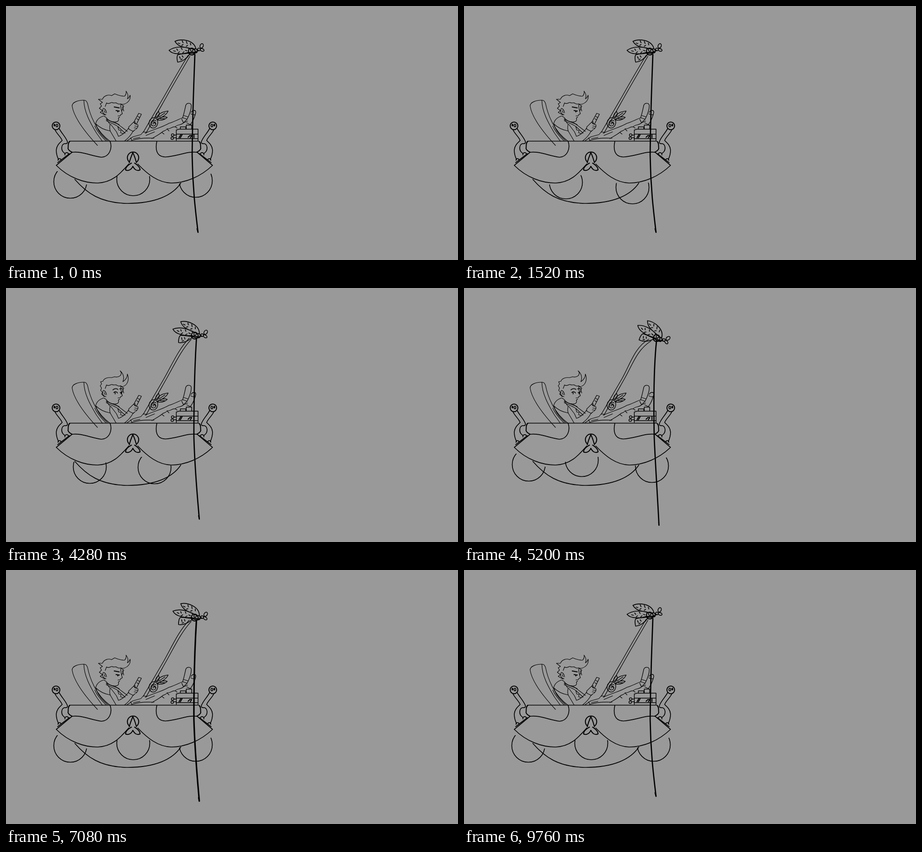
These frames come from a looping animation (998 px wide and 561 px high, 9.84 s). An HTML page:

```html
<!DOCTYPE html>
<html>
<head>
<meta charset="utf-8">
<style>
html, body { margin: 0; width: 100%; height: 100%; overflow: hidden; background: #999; }
svg { display: block; width: 998px; height: 561px; fill: none; stroke: #000; stroke-width: 1.15; stroke-linecap: round; stroke-linejoin: round; }
.mid { stroke-width: 1.7; }
.bold { stroke-width: 2.1; }
.ink { fill: #000; }
</style>
</head>
<body>
<svg viewBox="0 0 998 561">
<defs>
  <clipPath id="below"><path d="M95 350L108 362L150 384L180 395L202 393L243 376L262 373H300L318 376L338 392H382L410 390L450 373L470 350V460H95Z"/></clipPath>
  <g id="horn">
    <circle class="bold" cx="110.500" cy="264.800" r="8.500"/>
    <ellipse class="ink" cx="107" cy="263" rx="1" ry="2"/>
    <ellipse cx="112.500" cy="264" rx="2" ry="3"/>
    <path d="M108 273C111 281 121 289 124 297C119 302 112 307 111 318C111 328 114 335 116 339M117 270C122 280 130 287 135 298C137 302 135 305 129 304C122 306 122 316 125 321L130 326"/>
    <path d="M115 341C114 336 120 336 122 340M130 329C130 322 137 323 138 327M114 346L140 326"/>
    <path class="bold" d="M141 299C136 302 138 308 137 315C138 319 142 321 146 323"/>
  </g>
</defs>

<!-- hull -->
<g class="mid">
  <path stroke-width="1.300" d="M140 298.500H424"/>
  <path d="M230 299C235 314 229 333 211 334C190 332 166 320 146 323L111 352C138 379 172 391 202 391C236 390 253 369 271 349"/>
  <path d="M333 299C330 313 330 333 352 333.500C378 332 402 320 422 323L456 352C430 377 396 391 365 391C335 390 312 371 291 349"/>
  <path d="M152 383C178 413 208 435 268 436C330 436 368 418 386 391"/>
  <path class="bold" d="M273 345A12.500 12.500 0 1 1 288 345M280 324C277 331 274 339 272 346M280 324C284 331 286 339 288 346M277 347C271 350 264 356 264 362C269 365 277 362 280 354C284 362 290 365 296 362C296 356 289 350 284 347"/>
  <use href="#horn"/>
  <use href="#horn" transform="translate(567 0) scale(-1 1)"/>
</g>
<g id="balls" class="mid" clip-path="url(#below)">
  <circle r="36.500"/><circle r="36.500"/><circle r="36.500"/>
</g>
<circle id="speck" class="ink" cx="179" cy="396" r=".6" stroke="none"/>

<!-- seat and pilot -->
<path d="M202 308C175 279 150 247 146 221C146 212 160 208 172 208C177 208 178 211 180 215C185 240 199 277 230 299M172 208C172 233 186 258 200 281L213 299"/>
<path d="M215 243C206 246 200 251 198 260C207 269 218 274 230 276C228 269 229 265 230 262L221 249M199 262C203 277 213 287 224 297M196 265C203 281 214 291 221 298"/>
<path d="M222 250C231 256 240 257 247 261L268 277M221 253C232 259 241 261 248 267L263 281M240 257L250 262M231 261L244 278L248 287M230 276L243 298M247 267l2 7l5 1l-1 5l6 2"/>
<path d="M248 288C255 286 265 279 271 269M262 298C270 292 276 285 281 276M271 267C276 263 278 259 283 256C286 254 286 258 284 260L291 262C293 266 289 272 284 274L281 277L271 272ZM284 265l7 1M283 269l6 1"/>
<path stroke-width="1.300" d="M293 237L299 239L288 261L282 257ZM291 244L295 246M289 249L292 251"/>

<!-- legs and shoes -->
<path d="M267 298L280 289L298 284L303 278L312 279M277 297C293 292 313 291 327 292M281 293L296 290M275 291L278 297M307 281C326 272 343 269 360 259C371 256 381 250 390 247M309 286L328 278M322 293C330 288 338 284 344 279C348 274 351 278 356 271C362 273 366 266 373 267C379 261 386 264 392 258L401 254M344 279l5 4M356 272l4 4M374 267l4 3"/>
<path stroke-width="1.300" d="M390 247C393 238 395 228 397 219C400 213 408 214 409 219C410 230 404 242 400 250L392 258L388 250M391 247L400 250M393 242L402 245M409 235C412 229 419 229 419 235C417 244 413 254 407 262L399 258M408 238C411 240 414 241 418 240"/>

<!-- radio -->
<g stroke-width="1.500">
  <path d="M376 274L382 272H424V298M376 274V297M376 283H424M376 293H424M385 272V267H397V272M398 271V263H410V271"/>
  <path class="bold" d="M382 291L386 284M385 291L389 284M402 290l4 -4h4l-3 5M415 284V291"/>
  <circle cx="368" cy="285" r="2.800"/><circle cx="367" cy="292" r="2.800"/>
  <path d="M371 285H376M370 291H376"/>
</g>

<!-- reel -->
<g stroke-width="1.400">
  <ellipse cx="325.500" cy="258" rx="9.500" ry="11.500" transform="rotate(12 325 258)"/>
  <path d="M331 254C326 249 320 254 320 260C322 267 330 266 331 260C330 255 324 256 325 261M326 254l3 6"/>
  <path d="M332 247C337 237 347 233 358 232C354 241 345 246 334 250M335 251C342 244 350 244 356 246C350 252 342 253 335 252M331 246C329 240 333 236 337 233C340 238 338 243 334 247M338 245L351 236M340 249H350"/>
</g>

<!-- head -->
<path id="hair"/>
<path d="M219 222L222 214C226 218 231 213 234 213C238 216 242 212 245 215C248 217 251 217 254 216L253 221C255 227 254 231 257 238L253 240L253 242L247 243M251 245L248 248C250 253 247 256 241 256C231 256 225 252 221 246L216 243M221 240C213 240 212 230 215 226C220 227 221 232 222 236M217 231l2 5M254 217L260 221L256 231M257 222L260 232"/>
<path class="eyes bold" d="M239 223L250 225M243 231L250 232M247 232V234"/>
<path class="eyes bold" d="M238 225C242 222 246 222 249 225M240 232C243 235 247 235 250 232"/>
<path class="eyes mid" d="M236 225C240 221 245 222 247 224M251 223L256 222M238 231C241 228 245 229 246 232M241 231V234M252 231L256 230M254 231V234"/>

<!-- lure pole -->
<path id="rod" stroke-width="1.300"/>
<path id="line"/>
<g id="bird" class="mid">
  <path d="M-37 -23C-24 -29 3 -27 9 -8M-37 -23C-30 -11 -18 -10 -5 -8M-50 -3C-38 -12 -18 -12 -5 -7M-50 -3C-42 7 -20 6 -6 1M-31 7C-34 12 -32 19 -31 23C-20 22 -10 14 -5 6M-31 7C-24 4 -14 5 -7 3"/>
  <path d="M-30 -19l4 1M-21 -24l2 4M-12 -23l2 5M-3 -19l1 4M-22 -14l3 -2M-12 -12l3 -2M-40 -2l4 1M-33 -6l2 3M-23 -8l2 3M-30 3l3 -3M-20 3l3 -3M-14 -3l4 1M-27 11l2 4M-21 9l2 3M-24 18l3 -2"/>
  <path class="bold" d="M-7 -1C-8 -8 2 -10 5 -5C10 -2 8 5 2 7C-4 8 -8 4 -7 -1M-5 2C1 -1 8 4 15 -3M-6 4C1 2 6 6 12 1M6 -6C10 -8 13 -4 12 -1"/>
  <circle cx="0" cy="-4" r="2.800"/>
  <ellipse cx="22" cy="-13" rx="3.500" ry="5" transform="rotate(20 22 -13)"/>
  <ellipse cx="23" cy="-4" rx="4.500" ry="2.800" transform="rotate(20 23 -4)"/>
  <circle cx="16" cy="-5" r="3"/>
</g>
</svg>
<script>
const LOOP = 9840, STEP = 80;
const $ = s => document.querySelector(s);
const balls = [...document.querySelectorAll('#balls circle')];
const eyes = [...document.querySelectorAll('.eyes')];

// One ball's whole trip from right to left, one point per step.
const trip = [[430, 345], [424, 368], [419, 386], [415, 393], [395, 399], [372, 400.5],
  [350, 400], [328, 396], [310, 390], [295, 385], [281, 382.500], [260, 380], [243, 384],
  [225, 389.500], [205, 393], [185, 395], [166, 394], [150, 392], [142, 388], [143, 390],
  [141, 374]];

const hair = [
  'M219 241L208 235L213 231L206 226L211 221L208 216L213 213L204 206L213 206C216 198 226 195 233 198L240 194C247 197 258 200 262 199C265 196 266 191 265 188C270 194 270 200 268 205C272 203 273 200 274 197C276 206 270 214 260 217L255 217',
  'M217 239L209 232L213 229L210 226L212 222L209 217L212 213L208 207L214 206C217 198 226 195 233 196L240 195C247 196 256 199 259 198C263 195 263 193 262 190C267 196 265 202 262 208C268 205 272 203 273 198C275 207 268 216 258 218L254 216',
  'M217 240L211 234L213 231L209 226L211 221L208 216L211 212L209 207L214 206C216 199 226 197 233 198L240 196C247 198 254 194 254 190C255 188 254 185 252 183C260 190 261 199 258 207C264 203 268 198 268 190C273 203 268 216 256 218L252 216'];
const rod = [
  'M303 279C320 250 336 222 349 200C367 168 385 137 402 109M309 281C325 252 341 224 354 201C372 169 390 139 406 111',
  'M303 279C320 250 336 222 349 200C367 168 377 131 408 113M309 281C325 252 341 224 354 201C372 170 381 137 413 117'];
const line = [
  'M417 107C415 165 412 230 411 330C412 400 418 450 424 500L422 492',
  'M425 117C420 165 418 230 420 330C423 400 428 470 430.500 524L430 517'];

const mix = (a, b, k) => a + (b - a) * k;
const clamp = x => Math.min(1, Math.max(0, x));
const smooth = u => u * u * (3 - 2 * u);

function morph(a, b, k) {
  const to = b.match(/[\d.]+/g);
  let i = 0;
  return a.replace(/[\d.]+/g, n => mix(+n, +to[i++], k).toFixed(2));
}

function drawBalls(t) {
  // Two drawings are held for a double step.
  const phase = (Math.floor(t / STEP) - (t >= 7680) - (t >= 8400)) % 8;
  balls.forEach((ball, i) => {
    const p = trip[(phase + 2) % 8 + 8 * i];
    ball.setAttribute('visibility', p ? 'visible' : 'hidden');
    if (p) { ball.setAttribute('cx', p[0]); ball.setAttribute('cy', p[1]); }
  });
  $('#speck').setAttribute('visibility', phase == 1 ? 'visible' : 'hidden');
}

function drawHead(t) {
  const h = t < 6000 ? 2 * clamp((t - 3640) / 320) : 2 - 2 * clamp((t - 6280) / 320);
  const i = h < 1 ? 0 : 1;
  $('#hair').setAttribute('d', morph(hair[i], hair[i + 1], h - i));
  const look = Math.round(h);
  eyes.forEach((e, n) => e.setAttribute('visibility', n == look ? 'visible' : 'hidden'));
}

function drawPole(t) {
  const back = clamp((t - 6520) / 880);
  const k = t < 6000 ? smooth(clamp((t - 3880) / 880))
    : 1 - smooth(back) + .4 * Math.sin(Math.PI * back) * (1 - back);
  $('#rod').setAttribute('d', morph(rod[0], rod[1], k));
  $('#line').setAttribute('d', morph(line[0], line[1], k));
  $('#line').setAttribute('stroke-width', t >= 6360 && t < 7400 ? 3.300 : 2.700);
  $('#bird').setAttribute('transform', `translate(${mix(410, 425, k)} ${mix(101, 111, k)}) rotate(${31 * k})`);
}

function draw(now) {
  const t = now % LOOP;
  const half = Math.floor((t + 40) / STEP) * STEP - 40;
  drawBalls(t);
  drawHead(half);
  drawPole(half);
  requestAnimationFrame(draw);
}
requestAnimationFrame(draw);
</script>
</body>
</html>
```
